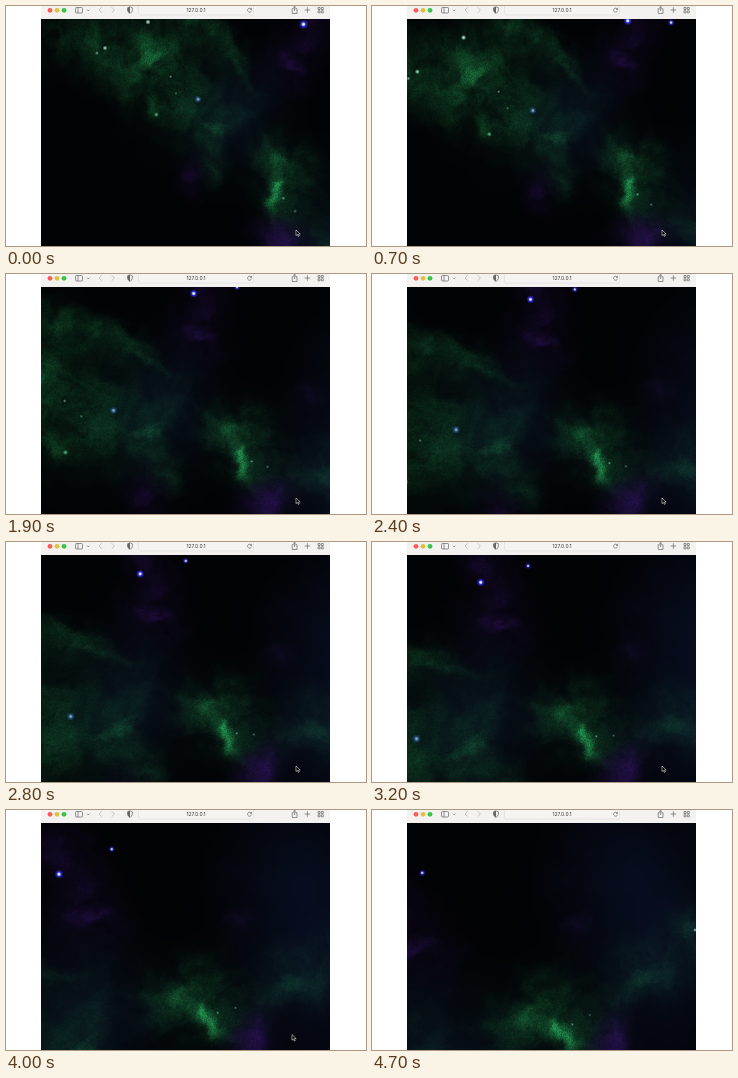
An HTML page with a canvas for the animation above (4.8 s loop, 360 by 240 pixels).

```html
<!DOCTYPE html>
<html lang="en">
<head>
<meta charset="utf-8">
<title>Nebula</title>
<style>
  html, body { margin: 0; width: 100%; height: 100%; overflow: hidden; background: #fff; }
  canvas { position: absolute; left: 35px; top: 13px; }
  svg { position: absolute; left: 0; top: 0; }
  text { font: 5px Inter, "Liberation Sans", sans-serif; }
</style>
</head>
<body>
<canvas id="sky" width="289" height="227"></canvas>
<svg width="360" height="240" viewBox="0 0 360 240" fill="none" stroke="#666" stroke-width=".7">
  <g stroke="none">
    <path d="M35 0H324V13H35Z" fill="#f3f2f1"/>
    <circle cx="44" cy="4.3" r="2.4" fill="#fc5b57"/>
    <circle cx="51" cy="4.3" r="2.4" fill="#e5bf3c"/>
    <circle cx="58" cy="4.3" r="2.4" fill="#35c649"/>
  </g>
  <rect x="132.5" y="-4" width="115" height="13" rx="2" fill="#f5f4f3" stroke="#dededd"/>
  <text x="190" y="6.3" text-anchor="middle" fill="#333" stroke="none">127.0.0.1</text>
  <rect x="69.5" y="1.5" width="7" height="5.5" rx="1"/>
  <path d="M72 1.5V7M81 3.7l1.2 1.2 1.2-1.2"/>
  <path d="M95.7 1.3L93 4l2.7 2.7M105.7 1.3L108.4 4l-2.7 2.7" stroke="#b5b5b5"/>
  <path d="M124 .8l2.4 1v2.4q0 2-2.4 3.2-2.4-1.2-2.4-3.2V1.8Z"/>
  <path d="M124 .8v6.6q-2.4-1.2-2.4-3.2V1.8Z" fill="#666" stroke="none"/>
  <path d="M245.3 3.2a2 2 0 1 0 .2 1.5M245.6 1.8v1.6H244"/>
  <path d="M287.8 2.7h-1.6v4.8h4.8V2.7h-1.6M288.6 5V.3M287.2 1.6L288.6.3 290 1.6M298.7 4h5.4M301.4 1.3v5.4"/>
  <path d="M312 1.5h2v2h-2ZM315.3 1.5h2v2h-2ZM312 4.8h2v2h-2ZM315.3 4.8h2v2h-2Z"/>
  <path id="cursor" d="M0 0V5.6L1.4 4.4 2.3 6.4 3.3 6 2.4 4H4.2Z" fill="#000" stroke="#ddd" stroke-width=".6"/>
</svg>
<script>
const LOOP = 4800, STEP = 100, CX = 180, CY = 127, LEFT = 35, TOP = 13;
const sky = document.getElementById('sky'), ctx = sky.getContext('2d');
const cursor = document.getElementById('cursor');
const image = ctx.createImageData(sky.width, sky.height);
const pixels = new Uint32Array(image.data.buffer);

// Camera turn: the generator of a projective map around the stage centre
const SPIN = [[.087, .154, -25], [-.17, .048, 11.5], [.00053, -.0001, 0]];
const UNIT = [[1, 0, 0], [0, 1, 0], [0, 0, 1]];
const multiply = (a, b) => a.map(r => [0, 1, 2].map(j => r[0] * b[0][j] + r[1] * b[1][j] + r[2] * b[2][j]));

function turn(s) {
  let sum = UNIT, term = UNIT;
  for (let n = 1; n < 32; n++) {
    term = multiply(term, SPIN).map(r => r.map(v => v * s / n));
    sum = sum.map((r, i) => r.map((v, j) => v + term[i][j]));
  }
  return sum;
}

function project(m, px, py) {
  const x = px - CX, y = py - CY, w = m[2][0] * x + m[2][1] * y + m[2][2];
  return [(m[0][0] * x + m[0][1] * y + m[0][2]) / w + CX,
          (m[1][0] * x + m[1][1] * y + m[1][2]) / w + CY, w];
}

// Interpolates between [time, value] knots
function ramp(knots, t) {
  let i = 1;
  while (i < knots.length - 1 && t > knots[i][0]) i++;
  const [t0, a] = knots[i - 1], [t1, b] = knots[i];
  return a + (b - a) * (t - t0) / (t1 - t0);
}
// Turn relative to the moment 1.4 s, in whose view the sky map is stored
const PACE = [[0, -2.05], [.7, -1], [1.4, 0], [2.4, 1.4], [4, 3.64], [4.7, 4.74]];
const viewAt = t => turn(ramp(PACE, t));
const mapFrom = t => turn(-ramp(PACE, t));

let seed = 7;
const random = () => {
  seed = (seed * 1664525 + 1013904223) >>> 0;
  return seed / 4294967296;
};
const lattice = Float32Array.from({ length: 65536 }, random);

function noise(x, y) {
  const i = Math.floor(x), j = Math.floor(y);
  let u = x - i, v = y - j;
  u *= u * (3 - 2 * u);
  v *= v * (3 - 2 * v);
  const l = i & 255, r = (i + 1) & 255, a = (j & 255) << 8, b = ((j + 1) & 255) << 8;
  const p = lattice[a + l], q = lattice[b + l];
  const top = p + (lattice[a + r] - p) * u;
  return top + (q + (lattice[b + r] - q) * u - top) * v;
}

function fbm(x, y, octaves) {
  let sum = 0, amp = .5, total = 0;
  for (let k = 0; k < octaves; k++) {
    sum += amp * noise(x, y);
    total += amp;
    amp *= .56;
    x = x * 2.03 + 17.3;
    y = y * 2.03 + 41.7;
  }
  return sum / total;
}

// Clouds grouped by the moment they are placed: [hue, x, y, rx, ry, degrees, strength]
const GREEN = 0, PURPLE = 1, BLUE = 2;
const HUES = [[25, 116, 58], [72, 24, 138], [14, 25, 62]];
const CLOUDS = [
  [0, [
    [GREEN, 75, 30, 58, 27, 0, .2],
    [GREEN, 112, 62, 32, 24, 20, .14]]],
  [1.4, [
    [GREEN, 110, 40, 56, 15, 33, .26],
    [GREEN, 158, 63, 36, 7, 42, .24],
    [GREEN, 58, 80, 42, 36, 20, .34],
    [GREEN, 92, 128, 56, 40, 10, .3],
    [GREEN, 80, 152, 20, 8, 15, .24],
    [GREEN, 156, 150, 16, 20, -15, .36],
    [GREEN, 174, 182, 13, 24, -15, .2],
    [GREEN, 180, 112, 50, 30, 20, .08],
    [GREEN, 237, 174, 9, 24, -14, .46],
    [GREEN, 250, 165, 32, 26, -15, .26],
    [GREEN, 244, 194, 20, 15, 20, .14],
    [PURPLE, 220, 57, 10, 8, 0, .5],
    [PURPLE, 219, 50, 26, 34, 20, .16],
    [PURPLE, 262, 229, 24, 17, -10, .27],
    [PURPLE, 152, 206, 16, 22, 0, .17],
    [PURPLE, 316, 132, 15, 13, 0, .16],
    [BLUE, 175, 125, 50, 60, 0, .25]]],
  [4, [
    [GREEN, 296, 178, 38, 18, -15, .2],
    [GREEN, 290, 142, 34, 17, -25, .12],
    [GREEN, 150, 192, 24, 24, 0, .14],
    [GREEN, 200, 190, 44, 28, 0, .1],
    [PURPLE, 55, 38, 30, 22, 0, .17],
    [BLUE, 290, 60, 65, 60, 0, .3]]],
  [4.7, [
    [GREEN, 314, 122, 18, 24, 20, .16],
    [BLUE, 290, 150, 70, 90, 0, .35]]]
].map(([t, list]) => ({
  view: viewAt(t),
  list: list.map(([hue, x, y, rx, ry, deg, power]) => {
    const a = deg * Math.PI / 180, c = Math.cos(a), s = Math.sin(a);
    return { hue, x, y, power, ax: c / rx, ay: s / rx, bx: -s / ry, by: c / ry };
  })
}));

const MAP = { x: -160, y: -70, w: 680, h: 520 };
const skyMap = new Uint32Array(MAP.w * MAP.h);

function paintMap() {
  const glow = [0, 0, 0];
  for (let j = 0, k = 0; j < MAP.h; j++) for (let i = 0; i < MAP.w; i++, k++) {
    const x = i + MAP.x, y = j + MAP.y;
    const wx = fbm(x / 26 + 90, y / 26 + 20, 5) - .5, wy = fbm(x / 26 + 30, y / 26 + 160, 5) - .5;
    const px = x + 30 * wx, py = y + 30 * wy;
    glow.fill(0);
    for (const { view, list } of CLOUDS) {
      const [u, v, w] = project(view, px, py);
      if (w < .15) continue;
      for (const b of list) {
        const dx = u - b.x, dy = v - b.y;
        const p = dx * b.ax + dy * b.ay, q = dx * b.bx + dy * b.by, d = p * p + q * q;
        if (d < 7) glow[b.hue] += b.power * Math.exp(-d);
      }
    }
    const base = fbm(px / 30 + 60, py / 30 + 70, 5);
    const ridge = 1 - Math.abs(2 * fbm(px / 22 + 120, py / 22 + 10, 5) - 1);
    const density = Math.pow(base * 1.15 + ridge * .5, 1.9) * (.82 + .36 * random());
    glow[GREEN] *= density;
    glow[PURPLE] *= density;
    const channel = (c, floor) =>
      Math.min(255, floor + glow[0] * HUES[0][c] + glow[1] * HUES[1][c] + glow[2] * HUES[2][c]) | 0;
    skyMap[k] = 0xff000000 | channel(2, 5) << 16 | channel(1, 3) << 8 | channel(0, 2);
  }
}

// Stars: [time, x, y, radius, glow colour, core opacity]
const STARS = [
  [1.4, 216, 16, 4.2, '40,50,255', 1],
  [1.4, 259, 13, 3.4, '45,40,235', .9],
  [1.4, 130, 121, 3.8, '45,85,225', .55],
  [1.4, 84, 154.5, 2.6, '70,220,140', .5],
  [1.4, 88, 107, 1.8, '80,190,140', .45],
  [1.4, 101, 123, 1.7, '50,180,100', .35],
  [1.4, 254, 187, 1.9, '80,160,120', .4],
  [1.4, 269, 194.5, 1.9, '90,140,120', .35],
  [0, 142, 16, 2.8, '150,200,180', .85],
  [0, 99, 42, 2.8, '130,200,160', .75],
  [0, 91, 47, 2.2, '130,190,150', .5],
  [4.7, 323, 120, 2.4, '80,190,170', .7]
].map(([t, x, y, ...look]) => [...project(mapFrom(t), x, y), ...look]);

function drawStar(view, [mx, my, mw, radius, tint, core]) {
  const [x, y, w] = project(view, mx, my);
  if (w < .1) return;
  const r = radius * Math.min(1.4, Math.max(.8, 1 / w));
  const g = ctx.createRadialGradient(x, y, 0, x, y, r);
  g.addColorStop(0, `rgba(255,255,255,${core})`);
  g.addColorStop(.25, `rgba(220,235,255,${core * .85})`);
  g.addColorStop(.5, `rgba(${tint},${core * .75})`);
  g.addColorStop(1, `rgba(${tint},0)`);
  ctx.fillStyle = g;
  ctx.fillRect(x - r, y - r, 2 * r, 2 * r);
}

function draw(t) {
  const back = mapFrom(t), view = viewAt(t);
  const [[a, b, c], [d, e, f], [g, h, n]] = back;
  for (let j = 0, k = 0; j < sky.height; j++) for (let i = 0; i < sky.width; i++, k++) {
    const x = i + LEFT - CX, y = j + TOP - CY, w = g * x + h * y + n;
    const u = Math.round((a * x + b * y + c) / w + CX - MAP.x);
    const v = Math.round((d * x + e * y + f) / w + CY - MAP.y);
    pixels[k] = skyMap[Math.max(0, Math.min(MAP.h - 1, v)) * MAP.w + Math.max(0, Math.min(MAP.w - 1, u))];
  }
  ctx.putImageData(image, 0, 0);
  ctx.save();
  ctx.translate(-LEFT, -TOP);
  ctx.globalCompositeOperation = 'lighter';
  for (const star of STARS) drawStar(view, star);
  ctx.restore();
  const cx = ramp([[0, 290], [3.7, 290], [4, 286], [4.7, 270]], t);
  const cy = ramp([[0, 224], [3.7, 224], [4, 224.6], [4.5, 242], [4.8, 242]], t);
  cursor.setAttribute('transform', `translate(${cx} ${cy})`);
}

paintMap();
let start, shown = -1;
function tick(now) {
  start ??= now;
  const step = Math.floor(((now - start) % LOOP) / STEP);
  if (step !== shown) draw((shown = step) * STEP / 1000);
  requestAnimationFrame(tick);
}
draw(0);
requestAnimationFrame(tick);
</script>
</body>
</html>
```
